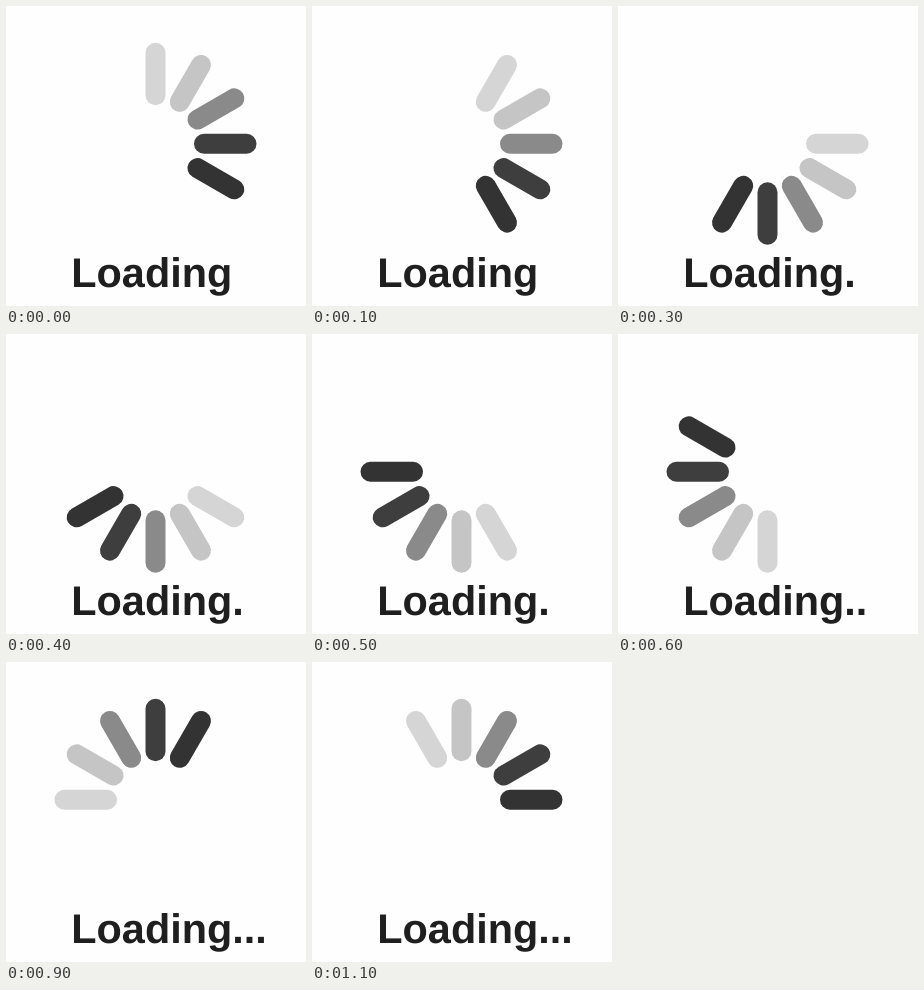
An HTML page that plays this animation: 300 px wide and 300 px high, repeating every 1200 ms.

```html
<!DOCTYPE html>
<html lang="en">
<head>
<meta charset="utf-8">
<title>Loading</title>
<style>
  html, body { margin: 0; width: 100%; height: 100%; overflow: hidden; background: #fefefe; }
  svg { display: block; width: 100%; height: 100%; }
  text {
    font: bold 41.4px "Liberation Sans", Arial, sans-serif;
    fill: #1f1f1f;
    text-rendering: geometricPrecision;
  }
</style>
</head>
<body>
<svg viewBox="0 0 300 300">
  <g id="spokes" transform="translate(149.5 137.8)"></g>
  <text id="label" x="65.3" y="281.3">Loading</text>
</svg>
<script>
  const STEPS = 12;
  const STEP_MS = 100;
  const SHADES = ["#333", "#3e3e3e", "#8a8a8a", "#c5c5c5", "#d5d5d5"]; // head to tail
  const START = 4;

  const group = document.getElementById("spokes");
  const label = document.getElementById("label");

  function makeSpoke(index) {
    const spoke = document.createElementNS("http://www.w3.org/2000/svg", "rect");
    const attributes = {
      x: -10, y: -101, width: 20, height: 62.5, rx: 10,
      transform: `rotate(${index * 360 / STEPS})`
    };
    for (const [name, value] of Object.entries(attributes)) spoke.setAttribute(name, value);
    return group.appendChild(spoke);
  }

  const spokes = Array.from({ length: STEPS }, (_, i) => makeSpoke(i));

  function draw(time) {
    const step = Math.floor(time / STEP_MS) % STEPS;
    spokes.forEach((spoke, i) => {
      const age = (step + START - i + STEPS) % STEPS;
      spoke.setAttribute("fill", SHADES[age] || "none");
    });
    label.textContent = "Loading" + ".".repeat(Math.floor(step / 3));
  }

  const start = performance.now();
  function tick() {
    draw(performance.now() - start);
    requestAnimationFrame(tick);
  }
  tick();
</script>
</body>
</html>
```
